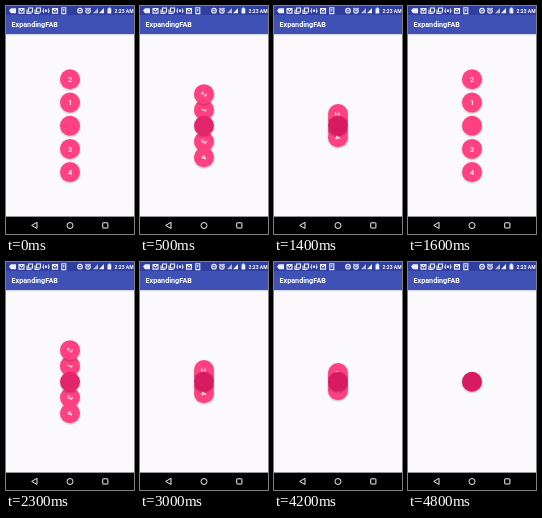
Animation of 128x228 px, one loop 4.9 s. Source, as an HTML page:

```html
<!DOCTYPE html>
<html lang="en">
<head>
<meta charset="utf-8">
<title>ExpandingFAB</title>
<style>
  html, body { margin: 0; width: 100%; height: 100%; overflow: hidden; background: #fcf9fc; }
  svg { display: block; width: 100vw; height: 100vh; }
  text { font-family: Roboto, sans-serif; fill: #fff; }
  .digit { font-size: 7.4px; font-weight: 500; text-anchor: middle; }
  .line { fill: none; stroke: #eceefa; stroke-width: 1.1; }
  .solid { fill: #eceefa; }
</style>
</head>
<body>
<svg viewBox="0 0 128 228">
  <defs>
    <linearGradient id="fade" x2="0" y2="1">
      <stop stop-color="#555577" stop-opacity=".25"/>
      <stop offset="1" stop-color="#555577" stop-opacity="0"/>
    </linearGradient>
    <filter id="blur" x="-30%" y="-30%" width="160%" height="160%">
      <feGaussianBlur stdDeviation=".9"/>
    </filter>
  </defs>

  <rect width="128" height="228" fill="#fcf9fc"/>
  <rect width="128" height="28" fill="#3f51b5"/>
  <rect width="128" height="9" fill="#303f9f"/>
  <rect y="28" width="128" height="2" fill="url(#fade)"/>

  <g class="solid">
    <path d="M3 4.6l2-2.4h5v5h-5z"/>
    <path d="M93 7.3h5v-5.3z"/>
    <path d="M101.5 2.4h1v-.8h1.8v.8h1v5.2h-3.8z"/>
    <path d="M87 7.3h5v-5.3z" opacity=".7"/>
    <circle cx="40" cy="4.7" r="1.2"/>
  </g>
  <g class="line">
    <path d="M13 2.5h5v4.6h-5zl2.5 2.4 2.5-2.4"/>
    <path d="M21 3.5v4h4.5M22.5 2h4v4h-4z"/>
    <path d="M29 3.5v4h4.5M30.5 2h4v4h-4z"/>
    <path d="M37.8 2.5q-1.6 2.2 0 4.4M42.2 2.5q1.6 2.2 0 4.4"/>
    <path d="M46.5 2.5h5v4.6h-5zl2.5 2.4 2.5-2.4"/>
    <path d="M55.8 1.8h4v5.8h-4zM57.8 3v2.6"/>
    <circle cx="74" cy="4.7" r="2.3"/>
    <circle cx="82" cy="4.9" r="2.2"/>
    <path d="M82 3.5v1.5h1.2M79.4 2.8l1.2-1M84.6 2.8l-1.2-1M72.5 4.7h3"/>
  </g>
  <text x="108.6" y="7" font-size="5" font-weight="700">2:23 AM</text>
  <text x="5.5" y="21.3" font-size="7.2" font-weight="700">ExpandingFAB</text>

  <g id="fabs"></g>

  <rect y="210.6" width="128" height="17.4" fill="#000"/>
  <g fill="none" stroke="#f2f2f2" stroke-width="1">
    <path d="M31 216.3v6.2l-5.3-3.1z" stroke-linejoin="round"/>
    <circle cx="64" cy="219.5" r="3"/>
    <rect x="96.7" y="216.8" width="5.2" height="5.2" rx=".4"/>
  </g>
</svg>
<script>
  const LOOP = 4900, STEP = 100, MOVE = 300;
  const X = 64, Y = 119.7, GAP = 23.2, R = 10;
  // [start time, opens]
  const moves = [[-400, true], [385, false], [1300, true], [2185, false], [2900, true], [3985, false]];
  const PINK = [255, 64, 129], DARK = [216, 27, 96];
  const host = document.getElementById('fabs');

  function add(parent, tag, attrs) {
    const el = document.createElementNS('http://www.w3.org/2000/svg', tag);
    for (const key in attrs) el.setAttribute(key, attrs[key]);
    return parent.appendChild(el);
  }

  function makeFab(label, slot) {
    const group = add(host, 'g', {});
    add(group, 'circle', { cy: 1.1, r: R - .3, fill: '#000', opacity: .28, filter: 'url(#blur)' });
    const disc = add(group, 'circle', { r: R, fill: '#ff4081' });
    const text = add(group, 'text', { class: 'digit', y: 2.6 });
    text.textContent = label;
    return { group, disc, text, slot };
  }

  // Painted inner pair first, so the outer digits stay visible while stacked.
  const minis = [['1', -1], ['3', 1], ['2', -2], ['4', 2]].map(f => makeFab(...f));
  const main = makeFab('', 0);
  main.group.setAttribute('transform', `translate(${X} ${Y})`);

  const ease = t => (1 - Math.cos(Math.PI * t)) / 2;

  function draw(time) {
    const [start, opens] = moves.filter(m => m[0] <= time).pop();
    const p = ease(Math.min(1, (time - start) / MOVE));
    const spread = opens ? p : 1 - p;
    const dark = Math.min(1, 2.2 * (1 - spread));

    for (const { group, text, slot } of minis) {
      group.setAttribute('transform', `translate(${X} ${Y + slot * GAP * spread})`);
      text.setAttribute('transform', `rotate(${360 * p})`);
      group.setAttribute('visibility', spread > .001 ? 'visible' : 'hidden');
    }
    const rgb = PINK.map((c, i) => Math.round(c + (DARK[i] - c) * dark));
    main.disc.setAttribute('fill', `rgb(${rgb})`);
  }

  const origin = performance.now();
  function tick() {
    const time = (performance.now() - origin) % LOOP;
    draw(Math.floor(time / STEP) * STEP);
    requestAnimationFrame(tick);
  }
  draw(0);
  requestAnimationFrame(tick);
</script>
</body>
</html>
```
